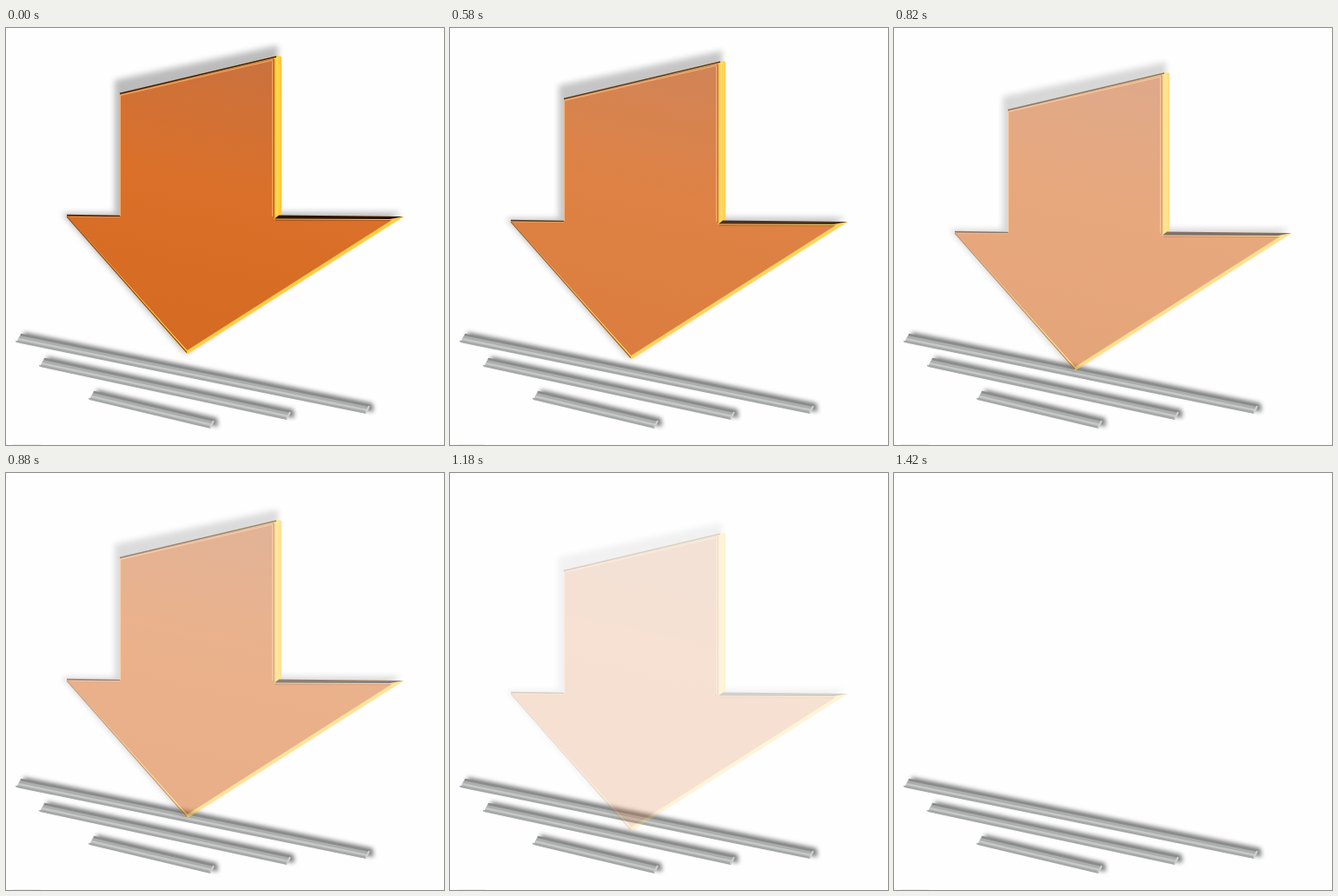
These frames come from a looping animation (504 px wide and 480 px high, 2220 ms). An HTML page:

```html
<!DOCTYPE html>
<html lang="en">
<head>
<meta charset="utf-8">
<title>Download arrow</title>
<style>
  html, body { margin: 0; width: 100%; height: 100%; overflow: hidden; background: #fefefe; }
  svg { display: block; width: 504px; height: 480px; }
</style>
</head>
<body>
<svg viewBox="0 0 504 480" fill="none">
  <defs>
    <linearGradient id="face" x1=".35" y1="1" x2=".6" y2="0">
      <stop offset="0" stop-color="#d56a22"/>
      <stop offset=".55" stop-color="#da7029"/>
      <stop offset="1" stop-color="#ca723f"/>
    </linearGradient>
    <linearGradient id="side">
      <stop offset="0" stop-color="#f2a422"/>
      <stop offset=".35" stop-color="#ffd84e"/>
      <stop offset="1" stop-color="#ffc636"/>
    </linearGradient>
    <filter id="soft" x="-20%" y="-20%" width="140%" height="140%"><feGaussianBlur stdDeviation="3.5"/></filter>
    <filter id="near" x="-20%" y="-60%" width="140%" height="220%"><feGaussianBlur stdDeviation="2.6"/></filter>
  </defs>

  <path d="M8 479.500H40" stroke="#f0f0f0"/>
  <g id="bars"></g>

  <g id="arrow">
    <path d="M125 60 313 20V212H455L206 375 64 213H125Z" fill="#000" opacity=".26" filter="url(#soft)"/>
    <path d="M131 75 311 32 317 33V216L458 217 208.500 375.500 69 215 131 216Z" fill="#ffcf45"/>
    <path d="M308 35 312 32 317 33V216L308 220Z" fill="url(#side)"/>
    <path d="M131 76 308 35V220L444 221 208.500 371 70 216H131Z" fill="url(#face)"/>
    <path d="M314 215.500 457 217 442 220 309 219.500Z" fill="#2b1204"/>
    <path d="M310 221.500H442" stroke="#b05018"/>
    <path d="M131 75.500 311 33M70 215.500 131 216.500" stroke="#3b1d0c" stroke-width="1.500"/>
    <path d="M131.500 216V77.500L307 37" stroke="#f5ac62" stroke-width="1.200"/>
    <path d="M306.500 38V217" stroke="#f3a55c"/>
    <path d="M308.300 36V219" stroke="#b9641a"/>
    <path d="M70 217 208 373.500" stroke="#9a4a14" stroke-width="1.200"/>
    <path d="M74 217.500H131" stroke="#e88a42"/>
  </g>
</svg>
<script>
  const LOOP = 2220, START = 520, STEP = 60, FADE_STEPS = 15, DROP = 3.1;
  const bars = document.getElementById('bars');
  const arrow = document.getElementById('arrow');

  // Top-left corner, length and fall of each bar
  const rails = [[17, 352, 402, 82], [44, 380, 284, 61], [101, 418, 139, 33]];
  bars.innerHTML = rails.map(([x, y, w, h]) => {
    const run = `l${w} ${h}`;
    return `<path d="M${x + 1} ${y - 2}${run}l1 10l${-w} ${-h}Z" transform="translate(2 0)" fill="#000" opacity=".5" filter="url(#near)"/>
      <path d="M${x} ${y}${run}l-5 10l${-w} ${-h}Z" fill="#acadad"/>
      <path d="M${x} ${y + 1}${run}" stroke="#8a8b8b" stroke-width="2.500"/>
      <path d="M${x - 3} ${y + 6}${run}" stroke="#c6c8c8" stroke-width="2.500"/>
      <path d="M${x - 6} ${y + 8.5}${run}" stroke="#a5a7a7" stroke-width="1.500"/>
      <path d="M${x + w - 1} ${y + h + 1}l-4 8" stroke="#cfd1d1" stroke-width="2"/>`;
  }).join('');

  function draw(now) {
    const t = now % LOOP;
    const step = Math.max(0, Math.min(FADE_STEPS, Math.floor((t - START) / STEP) + 1));
    arrow.setAttribute('transform', `translate(0 ${Math.round(step * DROP)})`);
    arrow.setAttribute('opacity', 1 - step / FADE_STEPS);
    requestAnimationFrame(draw);
  }
  draw(0);
</script>
</body>
</html>
```
